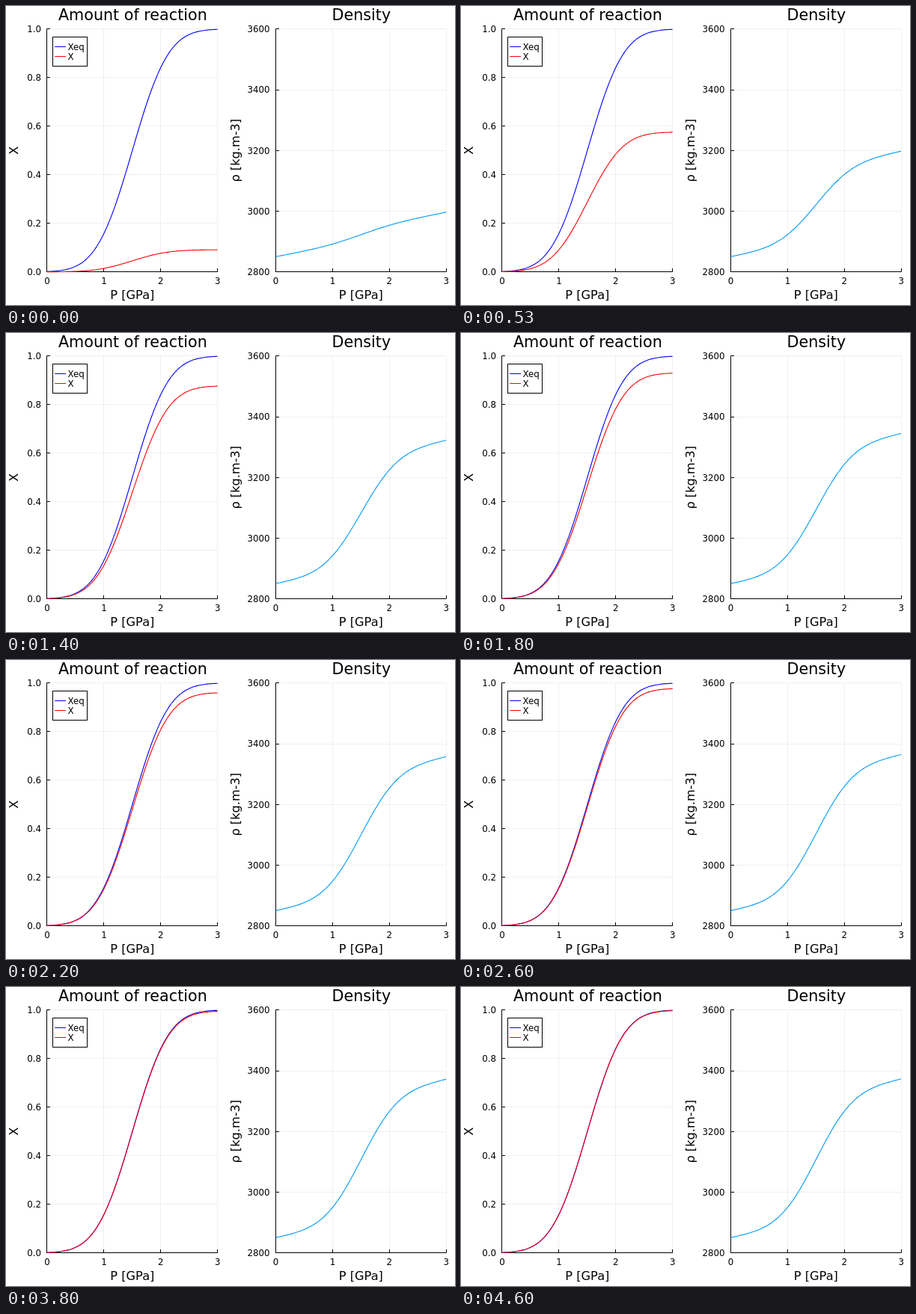
Animation of 600x400 px, one loop 4.67 s. Source, as an HTML page with a canvas:

```html
<!DOCTYPE html>
<html lang="en">
<head>
<meta charset="utf-8">
<title>Amount of reaction and density</title>
<style>
html, body { margin: 0; width: 100%; height: 100%; overflow: hidden; background: #fff; }
canvas { display: block; }
</style>
</head>
<body>
<canvas id="stage" width="600" height="400"></canvas>
<script>
const ctx = document.getElementById('stage').getContext('2d');
const LOOP = 4670, STEPS = 70, STEP_MS = 1000 / 15;
const TOP = 30.8, BOTTOM = 355.7, WIDTH = 227.7, P_MAX = 3;
const TICK = 11.8, LABEL = 16.2, TITLE = 20.7;

const left = {
  x: 55, min: 0, max: 1, ticks: [0, 0.2, 0.4, 0.6, 0.8, 1], format: v => v.toFixed(1),
  title: 'Amount of reaction', yLabel: 'X', yLabelX: 16
};
const right = {
  x: 360.5, min: 2800, max: 3600, ticks: [2800, 3000, 3200, 3400, 3600], format: String,
  title: 'Density', yLabel: 'ρ [kg.m-3]', yLabelX: 312
};

// Normal cumulative distribution by Simpson integration of the bell curve
function normalCdf(z) {
  const n = 40, h = z / n;
  let sum = 0;
  for (let i = 0; i <= n; i++) {
    const weight = i === 0 || i === n ? 1 : i % 2 ? 4 : 2;
    sum += weight * Math.exp(-((i * h) ** 2) / 2);
  }
  return 0.5 + sum * h / 3 / Math.sqrt(2 * Math.PI);
}

const equilibrium = p => normalCdf((p - 1.5) / 0.5);
const progress = step => 1 - 1.1 ** -(step + 1);
const density = (p, x) => (2850 + 400 * x) * Math.exp(p / 80);

const xAt = (plot, p) => plot.x + p / P_MAX * WIDTH;
const yAt = (plot, v) => BOTTOM - (v - plot.min) / (plot.max - plot.min) * (BOTTOM - TOP);
const crisp = v => Math.floor(v) + 0.5;

function line(x1, y1, x2, y2, color) {
  ctx.strokeStyle = color;
  ctx.beginPath();
  ctx.moveTo(x1, y1);
  ctx.lineTo(x2, y2);
  ctx.stroke();
}

function text(str, x, y, size, align, angle = 0) {
  ctx.save();
  ctx.translate(x, y);
  ctx.rotate(angle);
  ctx.font = `${size}px "DejaVu Sans", sans-serif`;
  ctx.textAlign = align;
  ctx.fillStyle = '#000';
  ctx.fillText(str, 0, 0);
  ctx.restore();
}

function axes(plot) {
  const x0 = crisp(plot.x - 0.1), x1 = plot.x + WIDTH, y0 = crisp(BOTTOM);
  const columns = [0, 1, 2, 3].map(p => crisp(xAt(plot, p) - 0.1));
  const rows = plot.ticks.map(v => crisp(yAt(plot, v)));
  const grid = '#f0f0f0';

  columns.forEach(x => line(x, TOP, x, BOTTOM, grid));
  rows.forEach(y => line(plot.x, y, x1, y, grid));
  line(x0, TOP - 0.3, x0, y0 + 0.5, '#000');
  line(x0 - 0.5, y0, x1 + 0.3, y0, '#000');
  columns.forEach((x, p) => {
    line(x, y0, x, y0 - 4.5, '#000');
    text(p, xAt(plot, p), 371.5, TICK, 'center');
  });
  rows.forEach((y, i) => {
    line(x0, y, x0 + 4.5, y, '#000');
    text(plot.format(plot.ticks[i]), plot.x - 8, yAt(plot, plot.ticks[i]) + 4.3, TICK, 'right');
  });

  const middle = plot.x + WIDTH / 2;
  text(plot.title, middle + 0.5, 18.5, TITLE, 'center');
  text('P [GPa]', middle, 392, LABEL, 'center');
  text(plot.yLabel, plot.yLabelX, 193.2, LABEL, 'center', -Math.PI / 2);
}

function curve(plot, fn, color) {
  ctx.strokeStyle = color;
  ctx.beginPath();
  for (let i = 0; i <= 150; i++) {
    const p = i / 150 * P_MAX;
    ctx.lineTo(xAt(plot, p), yAt(plot, fn(p)));
  }
  ctx.stroke();
}

function legend() {
  ctx.fillStyle = '#fff';
  ctx.strokeStyle = '#000';
  ctx.fillRect(62.5, 41.5, 46, 39);
  ctx.strokeRect(62.5, 41.5, 46, 39);
  line(65, 54.5, 80, 54.5, '#00f');
  line(65, 67.5, 80, 67.5, '#f00');
  text('Xeq', 82.5, 59, TICK, 'left');
  text('X', 82.5, 72, TICK, 'left');
}

function draw(now) {
  const time = now % LOOP;
  const step = Math.min(STEPS - 1, Math.floor((time + 4) / STEP_MS));
  const reacted = p => progress(step) * equilibrium(p);

  ctx.fillStyle = '#fff';
  ctx.fillRect(0, 0, 600, 400);
  ctx.lineWidth = 1;
  axes(left);
  axes(right);
  ctx.lineWidth = 1.1;
  curve(left, equilibrium, '#00f');
  curve(left, reacted, '#f00');
  curve(right, p => density(p, reacted(p)), '#009afa');
  ctx.lineWidth = 1;
  legend();
}

let start;
function tick(now) {
  start ??= now;
  draw(now - start);
  requestAnimationFrame(tick);
}
draw(0);
requestAnimationFrame(tick);
</script>
</body>
</html>
```
